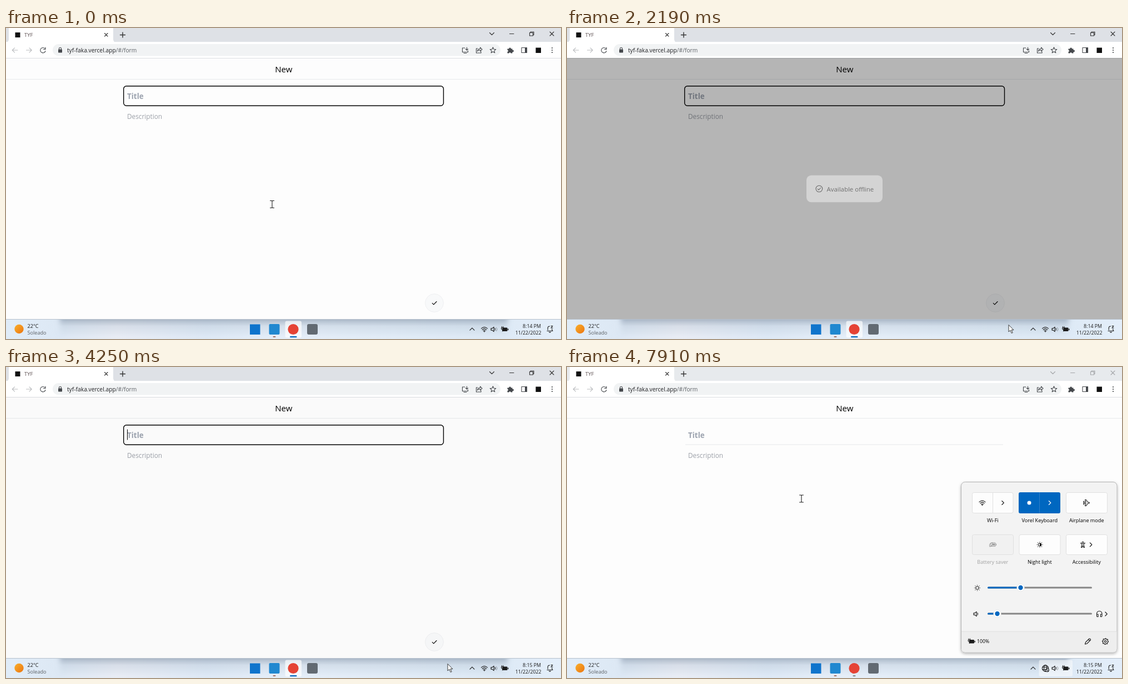
These frames come from a looping animation (999x561 px, 8 s). An HTML page:

```html
<!DOCTYPE html>
<html lang="en">
<head>
<meta charset="utf-8">
<title>Note form</title>
<style>
html, body { margin: 0; width: 100%; height: 100%; overflow: hidden; background: #fdfdfd; }
svg { display: block; width: 100%; height: 100%; font: 9.15px "Open Sans", "Noto Sans", sans-serif; }
.line { fill: none; stroke: currentColor; stroke-width: 1.1; stroke-linecap: round; stroke-linejoin: round; }
.mid { text-anchor: middle; }
.end { text-anchor: end; }
.tile { fill: #fdfdfd; stroke: #e0e0e0; }
</style>
</head>
<body>
<svg viewBox="0 0 999 561">
<defs>
  <linearGradient id="bar">
    <stop offset="0" stop-color="#e0ecf8"/><stop offset=".1" stop-color="#dde8f4"/>
    <stop offset=".2" stop-color="#e8ecf4"/><stop offset=".36" stop-color="#dde8f5"/>
    <stop offset=".5" stop-color="#e5eef8"/><stop offset=".88" stop-color="#dde9f5"/>
    <stop offset="1" stop-color="#e3eefa"/>
  </linearGradient>
  <linearGradient id="shade" x2="0" y2="1">
    <stop offset="0" stop-color="#8090a4" stop-opacity=".6"/>
    <stop offset=".4" stop-color="#8c9cb0" stop-opacity=".18"/>
    <stop offset="1" stop-color="#8c9cb0" stop-opacity="0"/>
  </linearGradient>
  <linearGradient id="sun" x2="1" y2="1">
    <stop offset="0" stop-color="#f9b02c"/><stop offset="1" stop-color="#ec7410"/>
  </linearGradient>
  <filter id="soft" x="-10%" y="-10%" width="120%" height="125%">
    <feDropShadow dx="0" dy="2" stdDeviation="2.5" flood-opacity=".28"/>
  </filter>
  <filter id="blur" x="-5%" width="110%"><feGaussianBlur stdDeviation="5 0"/></filter>
  <g id="wifi" class="line">
    <path d="M-5.5-1.3Q0-6.6 5.5-1.3M-3.7 .8Q0-2.7 3.7 .8M-1.9 2.8Q0 1.1 1.9 2.8"/>
    <circle cy="4" r=".5" fill="currentColor"/>
  </g>
  <g id="globe" class="line">
    <circle r="5.6"/><ellipse rx="2.5" ry="5.6"/><path d="M-5.2-2H5.2M-5.2 2H5.2"/>
    <circle cx="3.5" cy="3.3" r="2.9" fill="#edf3fa"/><path d="M1.5 1.3L5.5 5.3"/>
  </g>
  <g id="speaker" class="line">
    <path d="M-4.5-1.6H-2.4L.6-4.2V4.2L-2.4 1.6H-4.5ZM2.5-1.8Q4 0 2.5 1.8"/>
  </g>
  <g id="battery">
    <rect x="-4.5" y="-2.5" width="9" height="6.5" rx="1.2" fill="currentColor"/>
    <rect x="5" y="-.6" width="1.4" height="2.8" fill="currentColor"/>
    <path class="line" d="M-5.5-4.5V-2.5M-3-4.5V-2.5M-6.2-2.3H-2.2V0Q-4.2 2-6.2 0ZM-4.2 1V4"/>
  </g>
  <path id="next" class="line" d="M-1.7-3.5L1.8 0L-1.7 3.5"/>
  <g id="rays" class="line">
    <circle r="2.8"/>
    <path d="M0-5V-4.8M0 5V4.8M-5 0H-4.8M5 0H4.8M-3.6-3.6L-3.5-3.5M3.6-3.6L3.5-3.5M-3.6 3.6L-3.5 3.5M3.6 3.6L3.5 3.5"/>
  </g>
</defs>

<!-- browser window -->
<rect id="strip" width="999" height="26"/>
<path d="M0 26Q5 25.500 5 20V0H193V20Q193 25.500 198 26Z" fill="#fff"/>
<rect y="25" width="999" height="29" fill="#fff"/>
<rect id="favicon" x="16.500" y="8" width="9" height="9" fill="#111"/>
<path id="spinner" class="line" d="M0-4.800A4.800 4.800 0 1 1-4.800 0" style="color:#1a73e8;stroke-width:1.600"/>
<text x="33" y="16" font-size="9.500" fill="#5f5254">TYF</text>
<g class="line" color="#333">
  <path d="M177.500 9.500L183 15M183 9.500L177.500 15"/>
  <path d="M205.500 12.500H214.500M210 8V17" stroke-width="1.400"/>
</g>
<g id="controls" class="line" stroke-width="1">
  <path d="M870.500 8.500L874.500 12.500L878.500 8.500M906.500 10.500H914M979 7L986 14M986 7L979 14"/>
  <path d="M942.500 8.500H948.500V14H942.500ZM944 8.500V7H950V12.500H948.500"/>
</g>
<g class="line" color="#bbbdc0" stroke-width="1.300">
  <path d="M21 40H11.500M15.500 35.800L11.300 40L15.500 44.200M36.500 40H46M42 35.800L46.200 40L42 44.200"/>
</g>
<g color="#45484c">
  <path id="reload" class="line" stroke-width="1.400" d="M70 37A4.700 4.700 0 1 0 71 41.500M71 35V38.500H67.500"/>
  <path id="stop" class="line" stroke-width="1.400" d="M62.500 36L70 43.500M70 36L62.500 43.500"/>
  <rect x="84" y="29" width="806" height="21.500" rx="10.700" fill="#f1f3f4"/>
  <rect x="94" y="38.500" width="7" height="6" rx=".8" fill="currentColor"/>
  <path class="line" d="M95.500 38.500V37.200A2 2 0 0 1 99.500 37.200V38.500"/>
  <text x="110" y="44" font-size="10.280" fill="#202124">tyf-faka.vercel.app<tspan fill="#5f6368">/#/form</tspan></text>
  <g class="line">
    <path d="M826 36H821.500V43.500H831.500V41M824 45.500H829M829.500 35V40M827.300 38L829.500 40.200L831.700 38"/>
    <path d="M849 37H846.500V45H855V42.500M848.500 42Q849 37.500 853.500 37.500V35L857 38.700L853.500 42V39.800Q850.500 39.500 848.500 42Z"/>
    <path d="M876.500 34.800L878 38.300L881.800 38.600L878.900 41.100L879.800 44.800L876.500 42.800L873.200 44.800L874.100 41.100L871.200 38.600L875 38.300Z"/>
    <rect x="928" y="35.500" width="9.500" height="9"/>
  </g>
  <path d="M902.500 37.500H905.500A1.700 1.700 0 1 1 908.800 37.500H911.500V40A1.700 1.700 0 1 1 911.500 43V45.500H908.500A1.500 1.500 0 0 0 905.500 45.500H902.500V42.800A1.500 1.500 0 0 0 902.500 39.800Z" fill="currentColor"/>
  <rect x="934" y="35.500" width="4" height="9.500" fill="currentColor"/>
  <rect x="953.500" y="35.500" width="9.500" height="9.500" fill="#111"/>
  <path d="M983 36V36M983 40V40M983 44V44" class="line" style="stroke-width:2.200"/>
</g>

<!-- page -->
<rect y="54" width="999" height="471" fill="#fdfdfd"/>
<path d="M0 54.500H999" stroke="#dcdee1"/>
<path d="M0 92.500H999" stroke="#e8eaec"/>
<g id="content">
  <text class="mid" x="499.800" y="79.600" font-size="15" font-weight="500">New</text>
  <path id="underline" d="M213 140H785" stroke="#e6e8eb"/>
  <rect id="outline" x="211.700" y="104.700" width="575.800" height="35.600" rx="5" fill="none" stroke="#000" stroke-width="1.400"/>
  <text x="218" y="127.700" font-size="13.400" font-weight="700" fill="#9ca3af">Title</text>
  <text x="218" y="164.300" font-size="11.800" fill="#9ca0a8">Description</text>
  <circle cx="771" cy="496" r="16.400" fill="#f8f9fa" stroke="#eff0f2"/>
  <path class="line" d="M767.300 496.300L769.800 498.800L775 493.500" stroke-width="1.400"/>
</g>
<rect id="overlay" y="54" width="999" height="471"/>
<path id="caret" d="M218.500 112.500V131.500" stroke="#000"/>
<g id="toast">
  <rect x="-70.500" y="-25" width="141" height="50" rx="9" fill="#fff"/>
  <g class="line" stroke-width="1.500"><circle cx="-47" r="6"/><path d="M-49.800 .2L-47.800 2.200L-44.200-1.800"/></g>
  <text x="-33" y="5" font-size="11.800" fill="#111">Available offline</text>
</g>
<g id="status">
  <path d="M0 510H150Q154 510 154 514V525H0Z" fill="#dee1e6"/>
  <text x="5" y="521" font-size="8.500" fill="#5f6368">Waiting for tyf-faka.vercel.app...</text>
</g>

<!-- taskbar -->
<rect y="525" width="999" height="36" fill="url(#bar)"/>
<rect x="97" y="525" width="806" height="32" fill="url(#shade)" filter="url(#blur)"/>
<path d="M0 525.500H999" stroke="#b5c0cc"/>
<circle cx="23.500" cy="543" r="8.200" fill="url(#sun)"/>
<text x="38.500" y="540.500" fill="#1b1b1b">22°C</text>
<text x="38.500" y="552.800" fill="#5c6065">Soleado</text>
<rect x="439" y="534.500" width="18.500" height="18.500" fill="#0f74cc"/>
<rect x="473.500" y="534" width="19" height="19" rx="2" fill="#2088d0"/>
<rect x="480.500" y="556" width="5" height="2" rx="1" fill="#a06f6a"/>
<rect id="active" x="502.500" y="528.500" width="29.500" height="30" rx="3" fill="#fff" fill-opacity=".65"/>
<circle cx="517" cy="543.500" r="9.600" fill="#e54335"/>
<rect id="marker" y="556" height="2.200" rx="1"/>
<rect x="542" y="534" width="19" height="19" rx="3" fill="#626a72"/>
<rect id="tray" x="849.500" y="528.500" width="60.500" height="29.500" rx="3" fill="#fff" fill-opacity=".5"/>
<g color="#1b1b1b">
  <path class="line" d="M835 545.200L839 541.200L843 545.200"/>
  <use id="online" href="#wifi" x="861" y="543.500"/>
  <use id="offline" href="#globe" x="861" y="543.500"/>
  <use href="#speaker" x="877.500" y="543.500"/>
  <path class="line" d="M882.500 540.500Q885 543.500 882.500 546.500" opacity=".35"/>
  <use href="#battery" x="898" y="543"/>
  <path class="line" d="M974 546.500H984L982.800 544.500V543M975.200 544.500V541.500A3.500 3.500 0 0 1 978.500 538M977.500 548.500Q979 549.700 980.500 548.500M981 537.500H984L981 541H984"/>
</g>
<g class="end" font-size="8.800" fill="#1b1b1b">
  <text id="clock" x="963" y="540.500"></text>
  <text x="963.500" y="552.500">11/22/2022</text>
</g>

<!-- quick settings -->
<g id="panel" color="#1b1b1b">
  <rect x="709.500" y="207.500" width="280.500" height="307.500" rx="7" fill="#f3f3f3" stroke="#b4b4b4" filter="url(#soft)"/>
  <path d="M710 477.500H989.500V508Q989.500 514.500 983 514.500H716.500Q710 514.500 710 508Z" fill="#eee"/>
  <path d="M710 477H989.500" stroke="#dedede"/>
  <g id="wifiOn" color="#fff">
    <rect x="729" y="226" width="74.500" height="38" rx="3" fill="#0067c0"/>
    <path id="hover" d="M766 226H732Q729 226 729 229V261Q729 264 732 264H766Z" fill="#003e92"/>
    <path d="M766.500 226V264" stroke="#2f7fc9"/>
    <text class="mid" x="766.300" y="280" fill="#1b1b1b">CasaBrumal7</text>
  </g>
  <g id="wifiOff">
    <rect class="tile" x="729.500" y="226.500" width="73.500" height="37" rx="3"/>
    <path d="M766.500 227V263" stroke="#e0e0e0"/>
    <text class="mid" x="766.300" y="280">Wi-Fi</text>
  </g>
  <g id="wifiIcons"><use href="#wifi" x="747.500" y="245"/><use href="#next" x="784.500" y="245"/></g>
  <g color="#fff">
    <rect x="813" y="226" width="75" height="38" rx="3" fill="#0067c0"/>
    <path d="M850.500 226V264" stroke="#2f7fc9"/>
    <circle cx="832" cy="245" r="3.500" fill="#fff"/>
    <use href="#next" x="869" y="245"/>
  </g>
  <rect class="tile" x="898.500" y="226.500" width="74" height="37" rx="3"/>
  <path class="line" d="M930 242L931.500 244H934L932.500 239.500H934.500L937.500 244H939.500Q941.500 245 939.500 246H937.500L934.500 250.500H932.500L934 246H931.500L930 248Z"/>
  <rect class="tile" x="729.500" y="302.500" width="74" height="36" rx="3" style="fill:#f1f1f1"/>
  <g color="#a0a0a0">
    <rect class="line" x="763" y="317" width="8" height="6.500" rx="1"/>
    <path class="line" d="M772.500 319V321.500M761 324Q759 318 766 317Q766.500 323 761 324"/>
    <path d="M766 318.500H770V322H765Z" fill="currentColor"/>
  </g>
  <rect class="tile" x="814" y="302.500" width="74" height="36" rx="3"/>
  <use href="#rays" x="851" y="320.500"/><path d="M851 317.700A2.800 2.800 0 0 1 851 323.300Z"/>
  <rect class="tile" x="898.500" y="302.500" width="74" height="36" rx="3"/>
  <g class="line"><circle cx="928.500" cy="316.800" r="1.600"/>
    <path d="M924.500 317.500L927 319.500V321L925.500 325.500H927L928.500 322.500L930 325.500H931.500L930 321V319.500L932.500 317.500"/></g>
  <use href="#next" x="943" y="320.500"/>
  <g class="mid">
    <text x="850.800" y="280">Vorel Keyboard</text>
    <text x="935.300" y="280">Airplane mode</text>
    <text x="766.300" y="355" fill="#a0a0a0">Battery saver</text>
    <text x="850.800" y="355">Night light</text>
    <text x="935.300" y="355">Accessibility</text>
  </g>
  <use href="#rays" x="738.500" y="398.500"/>
  <use href="#speaker" x="736.500" y="445.500"/>
  <g id="sliders"></g>
  <path class="line" d="M953.500 447V445A4.700 4.700 0 0 1 963 445V447M953.500 446H956V450.500H954.500Q953.500 450.500 953.500 449ZM963 446H960.500V450.500H962Q963 450.500 963 449Z"/>
  <use href="#next" x="970.500" y="445.500"/>
  <use href="#battery" x="728.500" y="494.500"/>
  <text x="738" y="498.300" font-size="8.700">100%</text>
  <path class="line" d="M932.500 500L933.500 496.500L940 490Q942.500 489.500 942.500 492.500L936 499ZM938.500 491.500L941 494"/>
  <g class="line"><circle cx="969" cy="495" r="1.700"/>
    <path id="gear"/></g>
</g>

<path id="arrow" d="M0 0V12.500L3 9.800L5.200 15L7.200 14.100L5 9.200H9Z" fill="#fff" stroke="#222" stroke-width=".9"/>
<path id="beam" class="line" d="M-3.500-6.500H-1L0-5.800L1-6.500H3.500M0-5.800V5.800M-3.500 6.500H-1L0 5.800L1 6.500H3.500" style="color:#222"/>
</svg>

<script>
const LOOP = 8000;
const $ = id => document.getElementById(id);
const set = (id, name, value) => $(id).setAttribute(name, value);
const show = (id, on) => { $(id).style.display = on ? '' : 'none'; };
const part = (t, from, to) => Math.min(1, Math.max(0, (t - from) / (to - from)));
const easeOut = u => 1 - (1 - u) ** 2;
const smooth = u => u * u * (3 - 2 * u);

// start, end, x, y of each pointer move
const moves = [
  [0, 0, 479, 318], [1690, 2050, 794, 536], [2060, 2190, 795, 535.5],
  [4650, 4950, 864, 538], [5750, 5980, 730, 254], [6000, 6180, 717, 247],
  [6200, 6440, 739, 244], [7600, 7900, 422, 237.5]
];

function pointer(t) {
  let [, , x, y] = moves[0];
  for (const [from, to, nx, ny] of moves.slice(1)) {
    const u = smooth(part(t, from, to));
    x += (nx - x) * u;
    y += (ny - y) * u;
  }
  return [x, y];
}

$('sliders').innerHTML = [[398, 816.5], [445, 774.5]].map(([y, x]) => `
  <g stroke-width="3" stroke-linecap="round">
    <path d="M758.500 ${y}H943.500" stroke="#868686"/>
    <path d="M758.500 ${y}H${x}" stroke="#0067c0"/>
  </g>
  <circle cx="${x}" cy="${y}" r="6.800" fill="#fff" stroke="#e2e2e2" stroke-width=".7"/>
  <circle cx="${x}" cy="${y}" r="4.200" fill="#0067c0"/>`).join('');

set('gear', 'd', 'M' + Array.from({ length: 32 }, (_, i) => {
  const a = i * Math.PI / 16, r = i % 4 < 2 ? 5.5 : 4.2;
  return `${(969 + r * Math.cos(a)).toFixed(1)} ${(495 + r * Math.sin(a)).toFixed(1)}`;
}).join('L') + 'Z');

function draw(t) {
  const focused = t < 5000;
  const loading = t >= 330 && t < 1060;
  const wifi = t < 7180;

  // reload
  show('favicon', !loading);
  show('spinner', loading);
  set('spinner', 'transform', `translate(21 12.500) rotate(${t * 0.5})`);
  show('reload', !loading);
  show('stop', loading);
  show('content', t < 450 || t >= 590);
  show('status', t >= 390 && t < 590);

  // window focus
  set('strip', 'fill', focused ? '#dee1e6' : '#e7eaed');
  set('controls', 'color', focused ? '#333' : '#a4a6a9');
  show('outline', focused);
  show('underline', !focused);
  show('caret', focused && t >= 590 && Math.floor((t - 590) / 530) % 2 === 0);
  show('active', focused);
  set('marker', 'x', focused ? 511 : 514.5);
  set('marker', 'width', focused ? 12.5 : 5);
  set('marker', 'fill', focused ? '#0067c0' : '#858b92');

  // offline notice
  const dim = easeOut(part(t, 2050, 2350)) * (1 - easeOut(part(t, 4030, 4295)));
  const pop = easeOut(part(t, 2110, 2450)) * (1 - easeOut(part(t, 4030, 4230)));
  set('overlay', 'opacity', dim * 0.4);
  set('toast', 'opacity', pop);
  set('toast', 'transform', `translate(499.500 290) scale(${0.95 + 0.05 * pop})`);
  $('clock').textContent = t < 4100 ? '8:14 PM' : '8:15 PM';

  // quick settings
  const rise = 1 - (1 - part(t, 5030, 5380)) ** 3;
  show('panel', rise > 0);
  set('panel', 'transform', `translate(0 ${354 * (1 - rise)})`);
  show('tray', t >= 4880);
  show('hover', t >= 5930);
  show('wifiOn', wifi);
  show('wifiOff', !wifi);
  set('wifiIcons', 'color', wifi ? '#fff' : '#1b1b1b');
  show('online', wifi);
  show('offline', !wifi);

  const [x, y] = pointer(t);
  const overText = x > 211 && x < (focused ? 788 : 709) && y > 105 && y < 475;
  show('beam', overText);
  show('arrow', !overText);
  set(overText ? 'beam' : 'arrow', 'transform', `translate(${x} ${y})`);
}

const start = performance.now();
function tick() {
  draw((performance.now() - start) % LOOP);
  requestAnimationFrame(tick);
}
tick();
</script>
</body>
</html>
```
